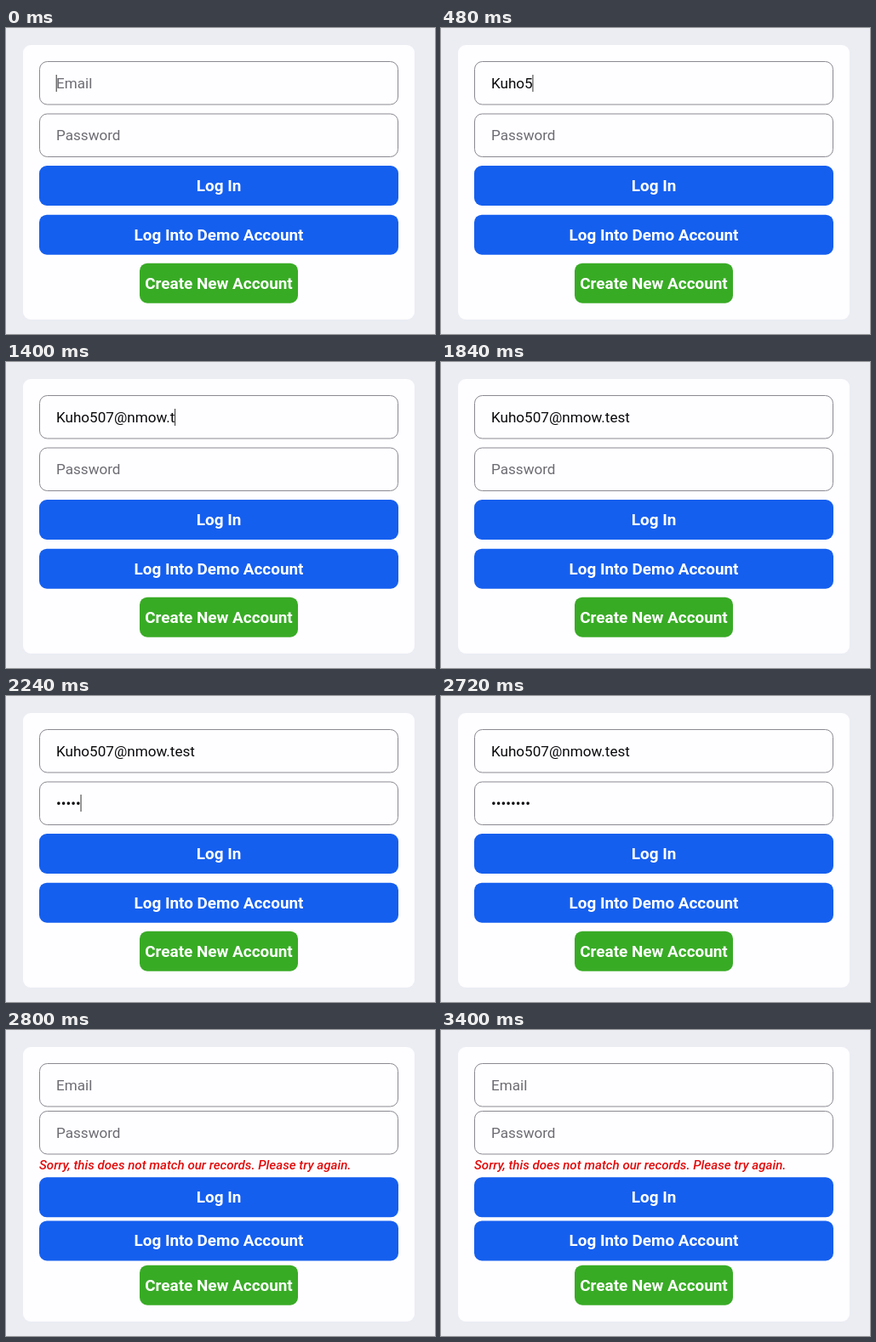
An HTML page that plays this animation: 504x360 px, repeating every 3440 ms.

```html
<!DOCTYPE html>
<html lang="en">
<head>
<meta charset="utf-8">
<title>Log in</title>
<style>
html, body { margin: 0; width: 100%; height: 100%; overflow: hidden; background: #ebedf3; }
svg { display: block; width: 504px; height: 360px; font: 17.1px Roboto, sans-serif; }
.field rect { fill: #fefdff; stroke: #8a8a91; }
.button text { fill: #fff; font-size: 18.9px; font-weight: 700; text-anchor: middle; }
.blue rect { fill: #155fef; }
.green rect { fill: #38ab25; }
#error { fill: #e20a0a; font-size: 15.1px; font-style: italic; font-weight: 500; }
#caret { fill: #333; }
</style>
</head>
<body>
<svg viewBox="0 0 504 360">
  <rect width="504" height="360" fill="#ebedf3"/>
  <rect x="20" y="20" width="460" height="323" rx="9" fill="#fefdff"/>
  <g class="field">
    <rect x="39.5" y="39.5" width="421" height="50.5" rx="9"/>
    <text id="email" x="59" y="71.3"></text>
  </g>
  <g class="field" id="passwordField">
    <rect x="39.5" y="101" width="421" height="50.5" rx="9"/>
    <text id="password" x="59" y="132.3"></text>
  </g>
  <text id="error" x="39" y="164.3">Sorry, this does not match our records. Please try again.</text>
  <g class="button blue" id="login">
    <rect x="39" y="162" width="422" height="47" rx="9"/>
    <text x="250" y="192">Log In</text>
  </g>
  <g class="button blue" id="demo">
    <rect x="39" y="219.7" width="422" height="47" rx="9"/>
    <text x="250" y="249.7">Log Into Demo Account</text>
  </g>
  <g class="button green">
    <rect x="157" y="276.7" width="186" height="47" rx="9"/>
    <text x="250" y="306.7">Create New Account</text>
  </g>
  <rect id="caret" width="1" height="20"/>
  <rect id="blank" width="504" height="360" fill="#fefdff"/>
</svg>
<script>
const LOOP = 3440, SUBMIT = 2760, RELOADED = 2800;
const ADDRESS = "Kuho507@nmow.test", SECRET = "•".repeat(8);
const $ = id => document.getElementById(id);

const show = (id, on) => $(id).setAttribute("visibility", on ? "visible" : "hidden");
const shift = (id, dy) => $(id).setAttribute("transform", `translate(0 ${dy})`);
const typed = (text, elapsed, step) => text.slice(0, Math.max(0, Math.floor(elapsed / step)));

function fill(id, value, hint) {
  const el = $(id);
  el.textContent = value || hint;
  el.setAttribute("fill", value ? "#0a0a0c" : "#6c6c72");
  return value ? el.getComputedTextLength() : 0;
}

function draw(t) {
  const failed = t >= RELOADED;
  const emailWidth = fill("email", failed ? "" : typed(ADDRESS, t + 20, 95), "Email");
  const secretWidth = fill("password", failed ? "" : typed(SECRET, t - 1840, 80), "Password");

  const inEmail = t < 1680, inPassword = t >= 1880 && t < 2600;
  show("caret", inEmail || inPassword);
  $("caret").setAttribute("x", 58.7 + (inEmail ? emailWidth : secretWidth));
  $("caret").setAttribute("y", inEmail ? 55 : 116);

  show("error", failed);
  show("blank", t >= SUBMIT && !failed);
  shift("passwordField", failed ? -5.5 : 0);
  shift("login", failed ? 11.3 : 0);
  shift("demo", failed ? 4.7 : 0);
}

const start = performance.now();
function tick() {
  draw((performance.now() - start) % LOOP);
  requestAnimationFrame(tick);
}
tick();
</script>
</body>
</html>
```
